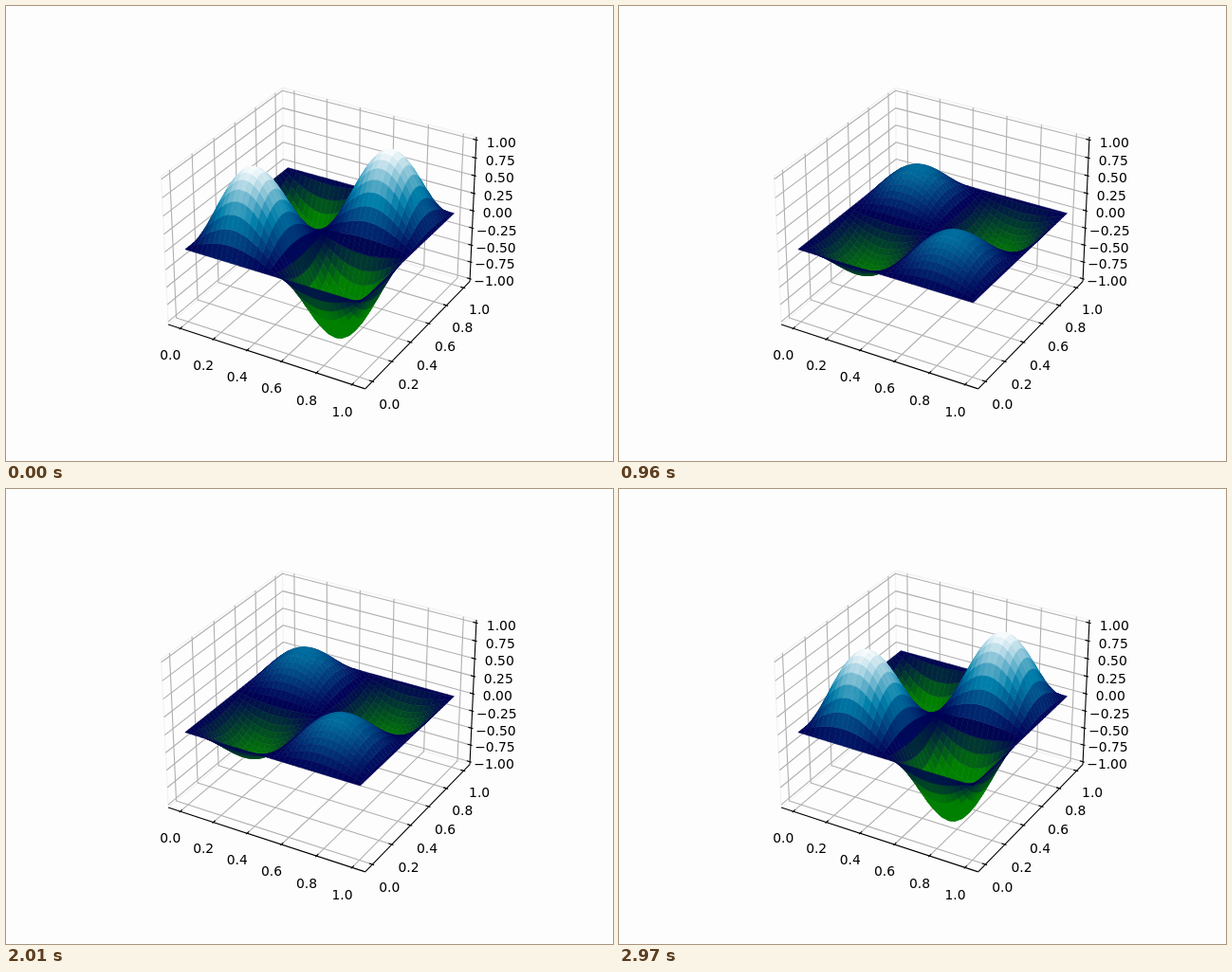
An HTML page with a canvas that plays this animation: 640 px wide and 480 px high, repeating every 3 s.

```html
<!DOCTYPE html>
<html lang="en">
<head>
<meta charset="utf-8">
<title>Standing wave</title>
<style>
  html, body { margin: 0; width: 100%; height: 100%; overflow: hidden; background: #fdfdfd; }
  svg, canvas { position: absolute; left: 0; top: 0; width: 640px; height: 480px; }
  path { fill: none; stroke-width: 1.11; }
  .pane { stroke: #f1f1f1; }
  .grid { stroke: #b0b0b0; stroke-linejoin: round; }
  .axis { stroke: #000; }
  text { font: 13.89px "DejaVu Sans", sans-serif; text-anchor: middle; fill: #000; }
</style>
</head>
<body>
<svg id="axes" viewBox="0 0 640 480"></svg>
<canvas id="surface" width="640" height="480"></canvas>
<script>
const FRAME_MS = 30, FRAMES = 100;
const POINTS = 101, STRIDE = 3;
const PAD = 1 / 48, LABEL_PAD = 0.1073;
const LO = -PAD, HI = 1 + PAD;

// Perspective view from elevation 30, azimuth -60; a, b, c run 0..1 across the axis limits.
const BOX = [8 / 7, 8 / 7, 6 / 7];
const S3 = Math.sqrt(3) / 2;
function project([a, b, c]) {
  const x = (a - 0.5) * BOX[0], y = (b - 0.5) * BOX[1], z = (c - 0.5) * BOX[2];
  const depth = 10 - (x * S3 / 2 - y * 0.75 + z * 0.5);
  const k = 1997.8 / depth;
  return [
    332.99 + k * (x * S3 + y * 0.5),
    237.41 - k * (-x * 0.25 + y * S3 / 2 + z * S3),
    depth
  ];
}
const normXY = v => (v + 0.05) / 1.1;
const normZ = v => (v + 1) / 2;

// ---- axes ----
const svg = document.getElementById("axes");
function add(tag, attrs, text = "") {
  const el = document.createElementNS("http://www.w3.org/2000/svg", tag);
  for (const key in attrs) el.setAttribute(key, attrs[key]);
  el.textContent = text;
  svg.appendChild(el);
}
function line(cls, ...points) {
  const d = points.map(p => project(p).slice(0, 2).map(v => v.toFixed(2)).join(","));
  add("path", { class: cls, d: "M" + d.join("L") });
}
function label(text, at) {
  const [x, y] = project(at);
  add("text", { x: x.toFixed(2), y: Math.round(y + 10.8) }, text);
}
const range = (n, from, step) => Array.from({ length: n }, (_, i) => from + i * step);
const ticksXY = range(6, 0, 0.2);
const ticksZ = range(9, -1, 0.25);
const IN = 1 / 60, OUT = 1 / 120, FAR = 1 + LABEL_PAD;

line("pane", [LO, LO, LO], [LO, LO, HI], [LO, HI, HI], [HI, HI, HI]);
line("pane", [LO, LO, LO], [LO, HI, LO], [HI, HI, LO]);
line("pane", [LO, HI, LO], [LO, HI, HI]);

for (const v of ticksXY) {
  const n = normXY(v);
  line("grid", [n, LO, LO], [n, HI, LO], [n, HI, HI]);
  line("grid", [HI, n, LO], [LO, n, LO], [LO, n, HI]);
}
for (const v of ticksZ) {
  const n = normZ(v);
  line("grid", [LO, LO, n], [LO, HI, n], [HI, HI, n]);
}

line("axis", [LO, LO, LO], [HI, LO, LO]);
line("axis", [HI, LO, LO], [HI, HI, LO]);
line("axis", [HI, HI, LO], [HI, HI, HI]);

for (const v of ticksXY) {
  const n = normXY(v), text = v.toFixed(1);
  line("axis", [n, LO + IN, LO], [n, LO - OUT, LO]);
  label(text, [n, -LABEL_PAD, -LABEL_PAD]);
  line("axis", [HI - IN, n, LO], [HI + OUT, n, LO]);
  label(text, [FAR, n, -LABEL_PAD]);
}
for (const v of ticksZ) {
  const n = normZ(v);
  line("axis", [HI - IN, HI, n], [HI + OUT, HI, n]);
  label(v.toFixed(2).replace("-", "\u2212"), [FAR, FAR, n]);
}

// ---- surface ----
const ctx = document.getElementById("surface").getContext("2d");
const LAST = POINTS - 1;
const wave = Array.from({ length: POINTS }, (_, i) => Math.sin(2 * Math.PI * i / LAST));

// Each patch is the outline of a block of grid points, as [i, j] pairs.
const patches = [];
for (let i = 0; i < LAST; i += STRIDE) {
  for (let j = 0; j < LAST; j += STRIDE) {
    const i2 = Math.min(i + STRIDE, LAST), j2 = Math.min(j + STRIDE, LAST);
    const outline = [];
    for (let k = i; k < i2; k++) outline.push([k, j]);
    for (let k = j; k < j2; k++) outline.push([i2, k]);
    for (let k = i2; k > i; k--) outline.push([k, j2]);
    for (let k = j2; k > j; k--) outline.push([i, k]);
    patches.push(outline);
  }
}

// Green through navy to white, for heights -0.5 to 1.
function ocean(z) {
  const t = Math.min(1, Math.max(0, (z + 0.5) / 1.5));
  const rgb = [Math.max(0, 3 * t - 2), Math.abs(3 * t - 1) / 2, t];
  return `rgb(${rgb.map(v => Math.round(v * 255)).join(",")})`;
}

function draw(amp) {
  const nodes = wave.map((wx, i) => wave.map((wy, j) => {
    const z = amp * wx * wy;
    const [x, y, depth] = project([normXY(i / LAST), normXY(j / LAST), normZ(z)]);
    return { x, y, z, depth };
  }));
  const mean = (pts, key) => pts.reduce((sum, p) => sum + p[key], 0) / pts.length;
  const cells = patches.map(outline => {
    const pts = outline.map(([i, j]) => nodes[i][j]);
    return { pts, depth: mean(pts, "depth"), color: ocean(mean(pts, "z")) };
  });
  cells.sort((a, b) => b.depth - a.depth);

  ctx.clearRect(0, 0, 640, 480);
  ctx.lineWidth = 0.6;
  ctx.lineJoin = "round";
  for (const { pts, color } of cells) {
    ctx.beginPath();
    for (const p of pts) ctx.lineTo(p.x, p.y);
    ctx.closePath();
    ctx.fillStyle = ctx.strokeStyle = color;
    ctx.fill();
    ctx.stroke();
  }
}

const start = performance.now();
let shown = -1;
function tick() {
  const step = Math.floor((performance.now() - start) / FRAME_MS) % FRAMES;
  if (step !== shown) {
    shown = step;
    draw(Math.cos(2 * Math.PI * step / (FRAMES - 1)));
  }
  requestAnimationFrame(tick);
}
tick();
</script>
</body>
</html>
```
